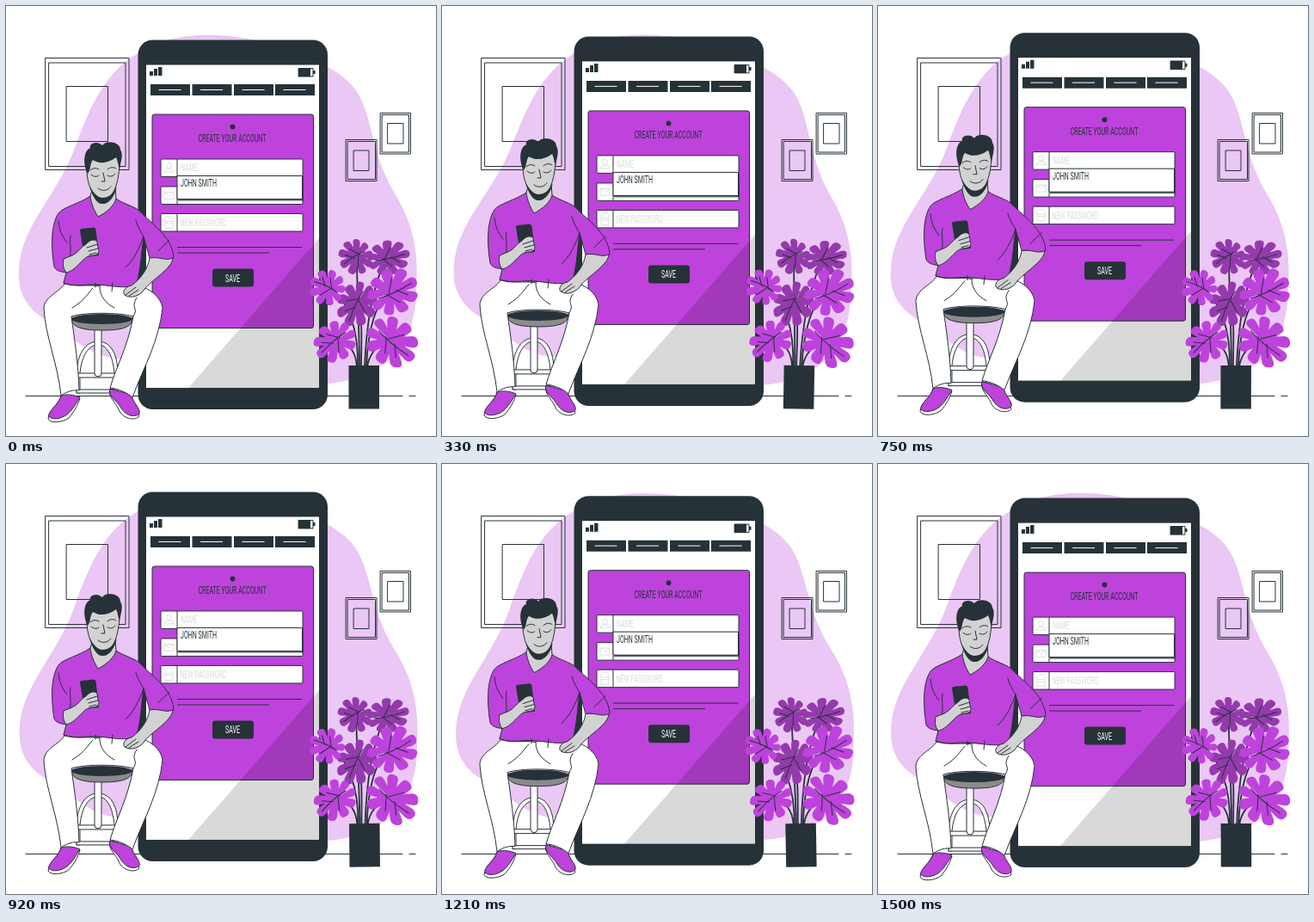
Write an HTML page that moves like this. It is 500 px wide and 500 px high and loops after 1540 ms.

```html
<!DOCTYPE html>
<html lang="en">
<head>
<meta charset="utf-8">
<title>Create your account</title>
<style>
  html, body { margin: 0; width: 100%; height: 100%; overflow: hidden; background: #fff; }
  svg { display: block; width: 100vw; height: 100vh; }
  .line { fill: none; stroke: #263238; stroke-width: 1; stroke-linecap: round; stroke-linejoin: round; }
  .dark { fill: #263238; }
  .white { fill: #fff; }
  .purple { fill: #bd43dc; }
  .skin { fill: #d2d2d2; }
  .ink { stroke: #263238; stroke-width: 1; stroke-linejoin: round; }
  .icon { fill: none; stroke: #dedede; stroke-width: 1; }
  text { font: 12.6px Roboto, Arial, sans-serif; fill: #263238; }
  .hint { fill: #dcdcdc; }
</style>
</head>
<body>
<svg viewBox="0 0 500 500">
  <path id="blob" fill="#eac7f4" d="M15 305C18 255 60 220 80 165C100 110 118 75 155 54C185 34 230 30 275 37C320 45 375 65 398 88C428 115 420 165 452 218C475 255 480 290 477 330C477 390 445 432 375 439C300 440 240 400 150 410C100 415 80 385 50 367C25 353 13 335 15 305Z"/>

  <g class="line">
    <path d="M23 453.5H461M469 453.5H476"/>
    <path d="M46 60.5H143V190.5H46ZM50 66H139V186.5H50ZM70.500 93.500H118.500V157.500H70.500Z"/>
    <path d="M395.500 155.500H431V203.500H395.500ZM397.500 157.500H429.500V201.500H397.500ZM404.500 168H422V191.500H404.500Z"/>
    <path d="M435.500 124.500H470.500V172H435.500ZM437.500 126.500H468.500V170H437.500ZM444 136.500H462V160H444Z"/>
  </g>

  <g id="phone">
    <rect class="dark" x="153.500" y="39.500" width="220.500" height="429.500" rx="17"/>
    <rect class="white" x="163" y="68.500" width="201" height="375.500"/>
    <path class="dark" d="M167 76h4v5h-4zM172 73h4v8h-4zM177 71h4.500v10H177z"/>
    <path class="dark" d="M340 72h14v10h-14zM357 75h2.500v4H357z"/>
    <path class="line" d="M340.500 72.500h16.500v9.500h-16.500z"/>
    <g id="tabs"></g>

    <rect class="purple ink" x="170" y="126" width="187.500" height="248.500" rx="2.500"/>
    <circle class="dark" cx="263.500" cy="140.500" r="3"/>
    <g id="fields" class="white ink"></g>
    <g class="icon">
      <circle cx="189.500" cy="185.500" r="3"/>
      <path d="M184 193c0-5 11-5 11 0z"/>
      <path d="M184 216.500h11v8h-11zl5.500 4.500l5.500-4.500"/>
      <path d="M185 250.500h9v8h-9zv-2.500c0-5 9-5 9 0v2.500M185 253h9"/>
    </g>
    <rect class="dark" x="200" y="198" width="146" height="28.500" opacity=".75"/>
    <rect class="white ink" x="199" y="197.500" width="145.500" height="27"/>
    <path class="line" d="M199.500 280.500H344M199.500 287H305.500"/>
    <rect class="dark" x="240" y="305.500" width="48" height="21" rx="3"/>
    <g id="labels"></g>
    <path d="M212 444L364 270V444Z" opacity=".15"/>
  </g>

  <g id="person">
    <g class="white ink">
      <path d="M82 450V425C84 400 95 390 107 390S129 400 130 425V450H126V427C124 405 117 394 107 394S88 405 86 427V450Z"/>
      <rect x="79" y="427" width="53" height="5"/>
      <rect x="82" y="446" width="44" height="4"/>
      <rect x="103" y="374" width="8" height="57" rx="4"/>
      <path fill="#8b8b8b" style="fill:#8b8b8b" d="M76 363C76 374 90 377 112 377S147 374 147 363Z"/>
    </g>
    <ellipse class="dark" cx="111.500" cy="364" rx="35.500" ry="6"/>

    <g class="ink">
      <path class="white" d="M64 453C62 463 50 470 49 480C52 486 66 484 73 479C80 471 84 463 86 456Z"/>
      <path class="purple" d="M64 453C62 463 50 469 49.500 477C54 482 64 480 71 475C79 468 82 461 86 455C79 452 71 451 64 453Z"/>
      <path class="white" d="M121 445C118 454 127 460 131 469C135 480 150 483 155 477L146 455Z"/>
      <path class="purple" d="M121 445C118 453 128 458 133 466C139 477 150 479 155 474C157 468 147 461 146 452Z"/>
      <path class="white" d="M68 323C62 333 44 338 44 352C46 385 60 415 64 453C71 448 79 446 85 447C84 415 80 390 76 361C92 356 130 356 148 361C142 395 128 420 121 444C130 445 140 449 147 455C160 420 178 390 182 351C180 337 165 328 156 326Z"/>
      <path class="purple" d="M98 221C85 230 66 234 61 241C51 256 53 285 56 303C58 308 64 309 70 310L67 322C80 327 92 323 108 324C128 326 144 330 152 322C157 305 157 290 160 268L167 293C176 291 182 295 187 301L195 292C193 268 168 252 157 240C151 233 138 231 128 224Z"/>
    </g>
    <path class="line" d="M101 328C95 334 92 342 77 351M104 322V327M109 327C109 337 116 346 126 351M124 322L123 332M152 339C144 352 155 350 148 361M75 267C73 278 78 285 72 299M61 250C62 263 67 270 71 275M160 268C155 260 152 254 151 249M160 268C154 284 148 296 139 304M177 285C181 280 187 276 190 272M67 322C80 328 96 323 110 326"/>
    <g class="skin ink">
      <path d="M101 211L98 221C99 230 103 239 107 245C117 240 126 232 128 224L127 211Z"/>
      <path d="M167 293C165 305 158 316 146 325C138 326 135 333 138 336C145 341 157 337 162 328C173 316 193 305 194 293C185 297 180 291 167 293Z"/>
      <path d="M94 180C93 200 96 218 112 229C126 223 131 205 132 184L128 172H100Z"/>
    </g>
    <path class="dark" d="M97 209C100 221 106 231 113 230C120 230 126 222 129 210C124 219 119 223 112 223C105 222 101 216 97 209Z"/>
    <path class="dark" d="M95 195C90 186 89 169 98 165C96 160 106 156 112 162C116 155 133 158 133 167C137 173 133 182 132 190C130 183 130 180 128 176C119 183 108 184 101 179C97 184 99 190 95 195Z"/>
    <path class="line" d="M98 191C101 188 105 188 108 190M118 190C121 187 126 187 128 189M99 196C102 199 106 199 108 197M118 197C121 199 125 198 127 195M113 194L115 204H111M107 212C112 216 118 215 122 210M139 336L151 327M143 337L154 330"/>

    <path class="dark" d="M86 261Q86 259 88 259L102 257.500Q104 257.500 104.500 260L108 290L91 292Z"/>
    <path class="skin ink" d="M67 294L77 290C84 287 87 280 93 277C98 271 104 271 106 274L107 281C109 285 108 289 102 290C94 290 91 294 86 299C81 304 76 309 70 310C66 305 66 299 67 294Z"/>
    <path class="line" d="M94 281L106 277M96 285L107 282M97 289L105 287"/>
  </g>

  <g id="plant">
    <path class="line" style="stroke-width:1.800" d="M411 420C411 380 408 325 408 296M417 420C419 370 425 330 440 298M409 420C410 375 398 345 380 330M419 420C421 375 430 345 446 333M413 420C413 390 415 370 410 348M408 420C407 402 400 394 386 388M420 420C422 405 430 395 446 388"/>
    <g id="leaves"></g>
    <rect class="dark" x="398.500" y="418" width="35.500" height="50.500"/>
  </g>
</svg>
<script>
const LOOP = 1540;
const LIGHT = '#bd43dc', SHADE = '#943aad';
const el = id => document.getElementById(id);
const fill = (id, items, draw) => { el(id).innerHTML = items.map(draw).join(''); };

fill('tabs', [168, 216.5, 265, 313], x =>
  `<path class="dark" d="M${x} 91h46v13h-46z"/><path stroke="#fff" d="M${x + 9.5} 97.500h26"/>`);

fill('fields', [178, 210, 241.5], y =>
  `<rect x="180" y="${y}" width="165" height="20.500" rx="1"/><path d="M199 ${y}v20.500"/>`);

// All labels share one narrow display style.
fill('labels', [
  ['CREATE YOUR ACCOUNT', 223.5, 158],
  ['NAME', 203, 192, 'hint'],
  ['JOHN SMITH', 203, 210],
  ['NEW PASSWORD', 202.5, 256, 'hint'],
  ['SAVE', 255, 320.5, 'white']
], ([label, x, y, type = '']) =>
  `<text class="${type}" transform="translate(${x} ${y}) scale(.56 1)">${label}</text>`);

// A split leaf: nine rounded lobes with the stalk notch at the back.
function leafPath(length, width) {
  const point = (deg, r) => {
    const a = deg * Math.PI / 180, reach = r * (1 + .08 * Math.cos(a));
    return `${(length * reach * Math.cos(a)).toFixed(1)} ${(width * reach * Math.sin(a)).toFixed(1)}`;
  };
  let d = `M${point(180, .2)}`;
  for (let a = -180; a < 180; a += 40) {
    d += `L${point(a + 5, .84)}Q${point(a + 8, 1)} ${point(a + 16, 1)}` +
         `Q${point(a + 32, 1.04)} ${point(a + 35, .82)}L${point(a + 40, a < 140 ? .52 : .2)}`;
  }
  return d + 'Z';
}

fill('leaves', [
  [408, 291, 20, 21, 150, SHADE],
  [443, 293, 25, 20, -12, SHADE],
  [409, 345, 27, 23, 115, SHADE],
  [375, 328, 21, 21, 205, LIGHT],
  [448, 333, 30, 27, -25, LIGHT],
  [384, 389, 26, 23, 140, LIGHT],
  [447, 389, 32, 28, 40, LIGHT]
], ([x, y, length, width, turn, color]) => {
  const l = length, w = width;
  return `<g transform="translate(${x} ${y}) rotate(${turn})">
    <path fill="${color}" d="${leafPath(l, w)}"/>
    <path class="line" d="M${-l * .55} 0Q0 ${w * .12} ${l * .85} 0M${-l * .2} 0L${l * .15} ${w * .55}M${-l * .1} 0L${l * .25} ${-w * .55}M${l * .2} 0L${l * .55} ${w * .4}"/>
  </g>`;
});

function draw() {
  const t = performance.now() % LOOP;
  const turn = ms => ms / LOOP * 2 * Math.PI;
  const lift = .1 - 8.5 * (1 - Math.cos(turn(t + 50))) / 2;
  const sway = Math.sin(turn(t));
  for (const id of ['phone', 'person']) el(id).setAttribute('transform', `translate(0 ${lift})`);
  el('blob').setAttribute('transform', `rotate(${sway} 250 235)`);
  el('plant').setAttribute('transform', `rotate(${sway} 416 370)`);
  requestAnimationFrame(draw);
}
draw();
</script>
</body>
</html>
```
